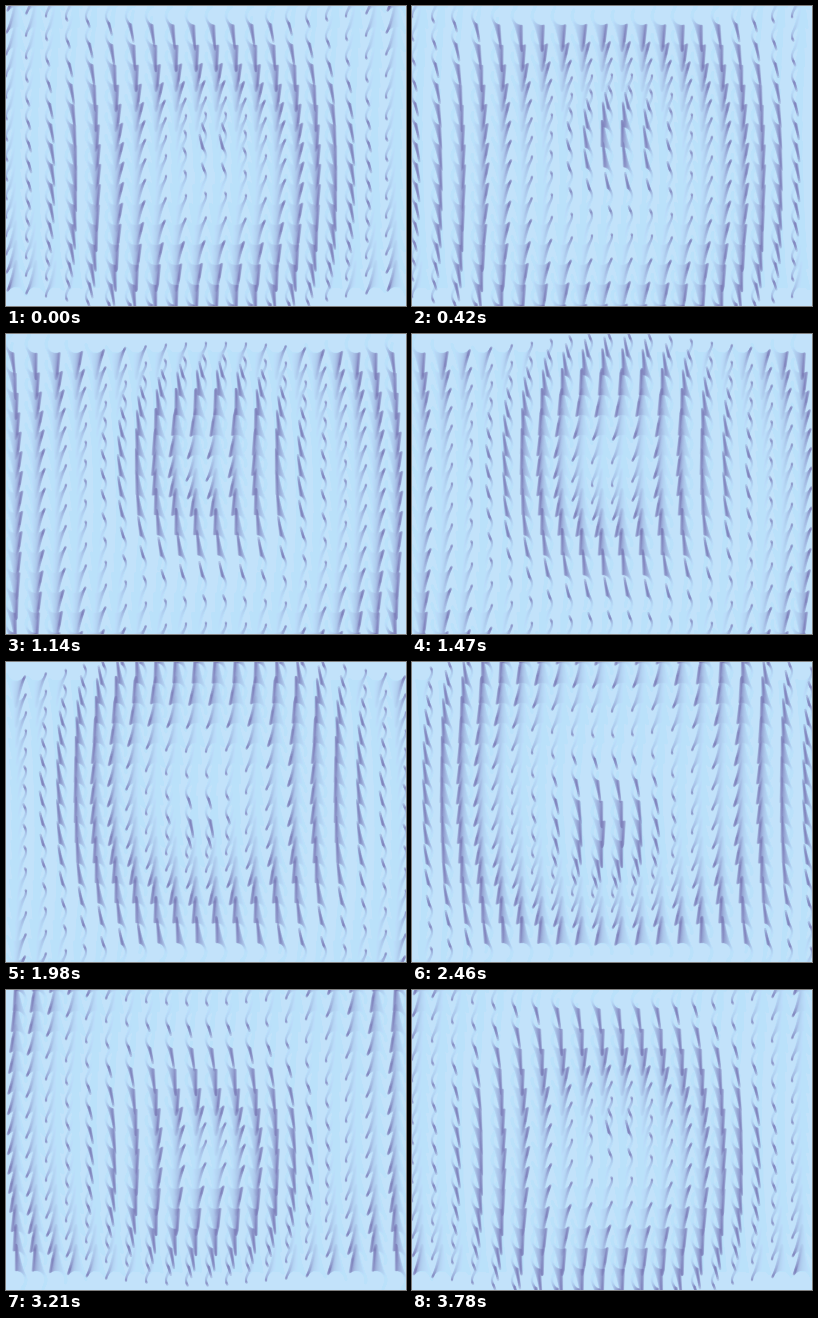
Recreate the animation shown at these times as an HTML page with a canvas. Size 400 px wide and 300 px high, loop 3.81 s.

```html
<!DOCTYPE html>
<html lang="en">
<head>
<meta charset="utf-8">
<title>Ripple field</title>
<style>
  html, body { margin: 0; width: 100%; height: 100%; overflow: hidden; background: #c2e2f6; }
  canvas { display: block; width: 400px; height: 300px; }
</style>
</head>
<body>
<canvas id="stage" width="400" height="300"></canvas>
<script>
const ctx = document.getElementById('stage').getContext('2d');
const W = 400, H = 300, GAP = 20;
const FRAMES = 127, STEP = 30;
const TURN = 2 * Math.PI / FRAMES;
const PAPER = '194,226,246', INK = '106,96,165';
const TRAIL = 50, FADE = 0.08, DAB = 0.22;
const WAVE = 0.0205, START = 132 * WAVE;

// A stick circles its grid point; its tip stretches near the top and bottom.
const RADIUS = 10, PINCH = 6, STRETCH = 25;

const sticks = [];
for (let y = GAP / 2; y < H; y += GAP) {
  for (let x = GAP / 2; x < W; x += GAP) {
    sticks.push({ x, y, lag: WAVE * Math.hypot(x - W / 2, y - H / 2) });
  }
}

function drawSticks(phase) {
  ctx.beginPath();
  for (const { x, y, lag } of sticks) {
    const s = Math.sin(phase - lag), c = Math.cos(phase - lag);
    const pulse = c * c;
    ctx.moveTo(x + RADIUS * s, y + RADIUS * c);
    ctx.lineTo(x + (RADIUS - PINCH * pulse) * s, y + (RADIUS + STRETCH * pulse) * c);
  }
  ctx.stroke();
}

function wash(alpha) {
  ctx.fillStyle = `rgba(${PAPER},${alpha})`;
  ctx.fillRect(0, 0, W, H);
}

function render(ms) {
  const frame = Math.floor(ms / STEP) % FRAMES;
  wash(1);
  ctx.lineWidth = 2.4;
  ctx.lineCap = 'round';
  ctx.strokeStyle = `rgba(${INK},${DAB})`;
  // Each new stick is laid over a thin wash that fades the older ones.
  for (let age = TRAIL; age >= 0; age--) {
    wash(FADE);
    drawSticks(START + (frame - age) * TURN);
  }
}

let begin;
function tick(now) {
  if (begin === undefined) begin = now;
  render(Math.max(0, now - begin));
  requestAnimationFrame(tick);
}
render(0);
requestAnimationFrame(tick);
</script>
</body>
</html>
```
